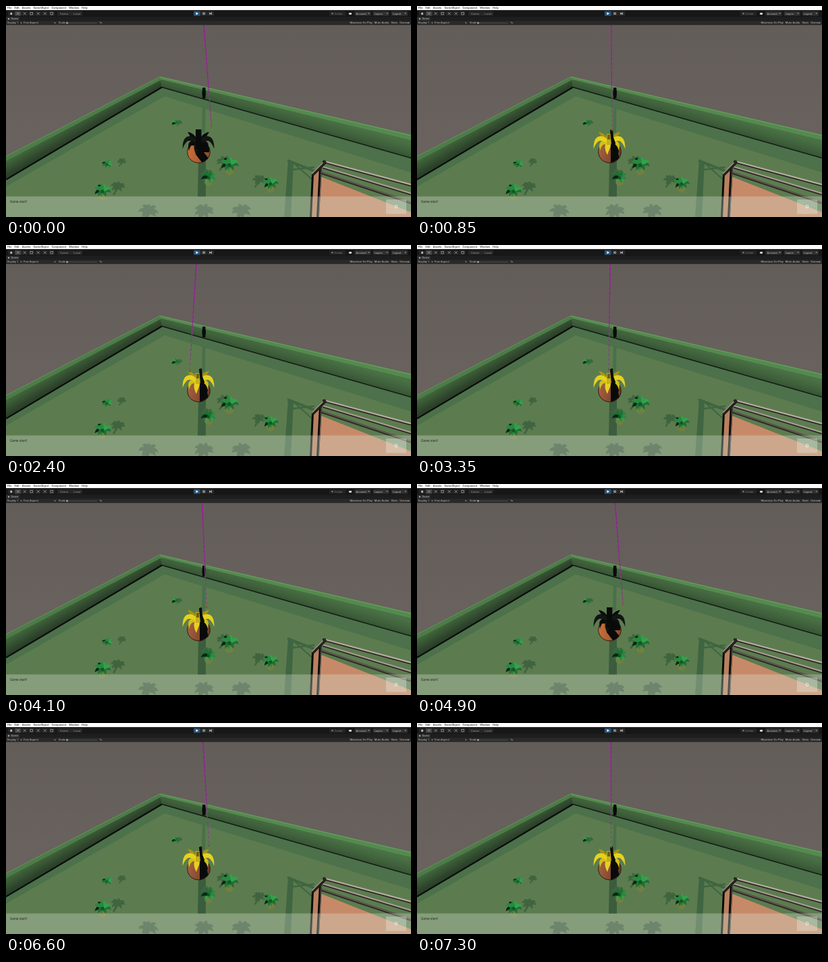
Write an HTML page with a canvas that moves like this. It is 600x313 px and loops after 7.35 s.

```html
<!DOCTYPE html>
<html lang="en">
<head>
<meta charset="utf-8">
<title>Garden game view</title>
<style>
html, body { margin: 0; width: 100%; height: 100%; overflow: hidden; background: #645e5a; }
canvas { display: block; width: 100vw; height: 100vh; }
</style>
</head>
<body>
<canvas id="stage"></canvas>
<script>
const W = 600, H = 313, LOOP = 7350, DARK = '#090b0a';
const stage = document.getElementById('stage');
const scale = window.devicePixelRatio || 1;
let c;

function prepare(canvas) {
  canvas.width = Math.round(W * scale);
  canvas.height = Math.round(H * scale);
  const ctx = canvas.getContext('2d');
  ctx.scale(canvas.width / W, canvas.height / H);
  return ctx;
}

function layer(draw) {
  const canvas = document.createElement('canvas');
  c = prepare(canvas);
  draw();
  return canvas;
}

function rect(x, y, w, h, fill) {
  c.fillStyle = fill;
  c.fillRect(x, y, w, h);
}

function poly(fill, ...p) {
  c.fillStyle = fill;
  c.beginPath();
  for (let i = 0; i < p.length; i += 2) c.lineTo(p[i], p[i + 1]);
  c.closePath();
  c.fill();
}

function line(color, width, x0, y0, x1, y1) {
  c.strokeStyle = color;
  c.lineWidth = width;
  c.beginPath();
  c.moveTo(x0, y0);
  c.lineTo(x1, y1);
  c.stroke();
}

function oval(x, y, rx, ry, fill) {
  c.fillStyle = fill;
  c.beginPath();
  c.ellipse(x, y, rx, ry, 0, 0, Math.PI * 2);
  c.fill();
}

function label(str, x, y, color = '#c0c0c0', size = 4.2) {
  c.fillStyle = color;
  c.font = size + 'px Roboto, Inter, sans-serif';
  c.textBaseline = 'middle';
  c.fillText(str, x, y);
  return c.measureText(str).width;
}

// Lays labels out from left to right
function row(words, x, y, gap, color) {
  for (const word of words) x += label(word, x, y, color) + gap;
}

function blend(x0, y0, x1, y1, ...colors) {
  const g = c.createLinearGradient(x0, y0, x1, y1);
  colors.forEach((col, i) => g.addColorStop(i / (colors.length - 1), col));
  return g;
}

// Tapered blade along a quadratic curve
function leaf(fill, x0, y0, cx, cy, x1, y1, w) {
  const left = [], right = [];
  for (let u = 0; u <= 1; u += 0.125) {
    const v = 1 - u;
    const x = v * v * x0 + 2 * u * v * cx + u * u * x1;
    const y = v * v * y0 + 2 * u * v * cy + u * u * y1;
    const dx = v * (cx - x0) + u * (x1 - cx), dy = v * (cy - y0) + u * (y1 - cy);
    const r = w / 2 * Math.sin(Math.PI * (0.2 + 0.8 * u)) / (Math.hypot(dx, dy) || 1);
    left.push(x - dy * r, y + dx * r);
    right.unshift(x + dy * r, y - dx * r);
  }
  poly(fill, ...left, ...right);
}

function rosette(x, y, r, count, tone) {
  for (let i = 0; i < count; i++) {
    const a = i * 2.4 + x * 0.1;
    const dx = Math.cos(a) * r, dy = Math.sin(a) * r * 0.7;
    leaf(tone(i, dx / r), x, y, x + dx * 0.65, y + dy * 0.7 - r * 0.45, x + dx, y + dy, r * 0.42);
  }
}

function plantShadow(x, y, r, color = '#40643f') {
  rosette(x, y, r, 8, () => color);
  line(color, r * 0.25, x, y, x - r * 0.6, y + r);
}

// Shadows lean towards the middle of the garden
function smallPlant(x, y, r) {
  plantShadow(x + (285 - x) * 0.16, y - (y - 160) * 0.05, r * 0.85);
  if (r > 10) oval(x, y + r * 0.5, r * 0.5, r * 0.55, '#717f42');
  const greens = ['#27893f', '#33a14c', '#1e6f34'];
  rosette(x, y, r, 10, (i, side) => side < -0.5 && i % 2 ? '#0d2512' : greens[i % 3]);
  oval(x, y, r * 0.2, r * 0.2, '#155528');
}

function drawGarden() {
  rect(0, 0, W, H, blend(0, 28, 0, 200, '#635d59', '#69625e'));
  poly('#4d714a', 0, 257, 231, 120, W, 225, W, H, 0, H);
  poly('#5c7c4f', 0, 268, 235, 134, W, 247, W, H, 0, H);

  poly(blend(110, 166, 128, 197, '#42683c', '#2d432b', '#202e20'),
    0, 224, 228, 105, 231, 120, 0, 257);
  poly(blend(420, 152, 412, 180, '#4a7145', '#3e5f3a', '#2d472d'),
    228, 105, W, 191, W, 225, 231, 120);
  poly('#4d7c48', 0, 223, 228, 105, 231, 109, 0, 230);
  poly('#548a4e', 228, 105, W, 191, W, 199, 230, 109);
  line('#679c60', 0.8, 0, 223, 228, 105);
  line('#6ea166', 1, 228, 105, W, 192);
  line('#090d09', 2.2, 0, 257.5, 231, 120.5);
  line('#101a13', 1.4, 231, 120.5, W, 225.5);

  poly('#49704a', 291, 150, 295.5, 150, 295, 188, 290, 188);
  poly('#3b5d3d', 285, 230, 296, 230, 296, 283, 284, 283);
  for (const x of [211, 293, 349]) plantShadow(x, 306, 15, '#385739');

  // Shadow of the bed frame
  poly('#3f6541', 418, 229, 426, 231, 422, H, 412, H);
  line('#3f6541', 3.5, 417, 229, 460, 246);
  line('#3f6541', 2.5, 423, 243, 457, 239);
  line('#3f6541', 2, 426, 233, 453, 257);

  smallPlant(251, 174, 6);
  smallPlant(150, 235, 8);
  smallPlant(143, 275, 13);
  smallPlant(331, 236, 14);
  smallPlant(300, 255, 11.5);
  smallPlant(392, 264, 12);

  rect(291, 121, 4.4, 16, DARK);
  oval(293.2, 129, 2.8, 7, DARK);
}

function drawBed() {
  poly('#b9805f', 454, 251, 467, 241, 463, H, 451, H);
  poly('#c78a69', 466, 253, W, 306, W, H, 463, H);
  for (let i = 0; i < 3; i++) {
    const x = 472 - i * 2.5, y = 230.5 + i * 8, end = 265 + i * 13;
    line('#2b2622', 3.6, x, y + 1, W, end + 1);
    line(['#b9aea3', '#a89e94', '#5d564e'][i], 2.3, x, y, W, end);
  }
  line(DARK, 3, 454.5, 249, 451.5, H);
  line(DARK, 4, 466, 239, 462, H);
  line('#84776b', 0.8, 467, 241, 463.5, H);
  line('#24201d', 4, 454, 251, 474, 231);
  line('#a0958a', 1.4, 453, 249, 471, 231);
  oval(471.5, 231, 2.6, 2.3, '#2a2521');
}

function drawOverlay() {
  rect(0, 282.5, W, 30.5, 'rgba(215,222,208,0.34)');
  rect(563, 287, 30, 21.5, 'rgba(235,238,228,0.33)');
  label('Game start!', 6, 291, '#253022', 4.8);
  label('0', 575.7, 298, '#fff', 8);
}

function drawIcons() {
  for (let i = 0; i < 7; i++) {
    const x = 7.7 + i * 10;
    rect(x - 4.7, 8, 9.4, 6.5, i === 1 ? '#444' : '#242424');
    if (i === 0) oval(x, 11.3, 1.5, 1.9, '#bbb');
    else if (i % 3) {
      line('#aaa', 0.7, x - 2, 13, x + 2, 9.4);
      line('#aaa', 0.7, x - 2, 9.4, x + 2, 13);
    } else {
      c.strokeStyle = '#aaa';
      c.strokeRect(x - 1.7, 9.5, 3.4, 3.4);
    }
  }
  for (let i = 0; i < 3; i++) rect(278 + i * 10.2, 7.8, 9.6, 6.8, i ? '#282828' : '#28557c');
  poly('#fff', 281.5, 9.2, 285, 11.2, 281.5, 13.2);
  rect(291.6, 9.4, 1, 3.6, '#ddd');
  rect(293.6, 9.4, 1, 3.6, '#ddd');
  poly('#ddd', 301.5, 9.4, 304, 11.2, 301.5, 13);
  rect(304.2, 9.4, 0.8, 3.6, '#ddd');
}

function drawEditor() {
  rect(0, 0, W, 6.2, '#fbfbfb');
  rect(0, 6.2, W, 9.8, '#171717');
  rect(0, 16, W, 6, '#1e1e1e');
  rect(0, 16, 20, 6, '#2d2d2d');
  rect(0, 22, W, 6.2, '#292929');
  row(['File', 'Edit', 'Assets', 'GameObject', 'Component', 'Window', 'Help'], 2, 3.2, 4, '#111');

  drawIcons();
  rect(76, 8, 37, 6.5, '#262626');
  row(['Center', 'Local'], 80, 11.3, 8, '#999');

  rect(479, 8, 24, 6.5, '#232323');
  oval(483.5, 11.2, 1.3, 1.3, '#777');
  label('Collab', 486.5, 11.3, '#777');
  oval(510, 11.5, 2.3, 1.4, '#ddd');
  ['Account', 'Layers', 'Layout'].forEach((word, i) => {
    const x = 518.5 + i * 27.2;
    rect(x - 2, 8, 24, 6.5, '#303030');
    label(word, x, 11.3);
    poly('#aaa', x + 17.5, 10.5, x + 20.5, 10.5, x + 19, 12);
  });

  oval(4, 19, 1.2, 1.2, '#aaa');
  label('Game', 7.5, 19.1);
  label('Display 1', 1.5, 25.2);
  label('Free Aspect', 26, 25.2);
  label('Scale', 78, 25.2);
  label('1x', 138, 25.2);
  row(['Maximize On Play', 'Mute Audio', 'Stats', 'Gizmos'], 509.5, 25.2, 3.2);
  for (const x of [21, 71, 595]) poly('#aaa', x, 24.5, x + 3, 24.5, x + 1.5, 26);
  line('#606060', 0.7, 89, 25.2, 135, 25.2);
  oval(90.5, 25.2, 1.4, 1.4, '#aaa');
}

function drawPlant(lit) {
  const tone = n => lit ? ['#d3bf18', '#e5d120', '#a7950f'][n] : ['#0b0d0c', '#121513', DARK][n];
  const x = 285;
  c.save();
  c.beginPath();
  c.ellipse(x + 0.5, 216.5, 17, 16.5, 0, 0, Math.PI * 2);
  c.clip();
  rect(268, 199, 36, 35, lit
    ? blend(270, 212, 302, 222, '#a2603f', '#8b4d33', '#693825')
    : blend(270, 212, 302, 222, '#c66e39', '#b26034', '#8b4824'));
  rect(268, 199, 36, lit ? 6 : 8, DARK);
  if (lit) poly(DARK, 287, 200, 302, 203, 298, 219, 300, 226, 287, 234);
  else poly(DARK, 279, 204, 303, 204, 301, 217, 293, 217, 300, 226, 291, 233, 281, 220);
  c.restore();
  c.strokeStyle = '#2b1b14';
  c.lineWidth = 1;
  c.beginPath();
  c.ellipse(x + 0.5, 216.5, 16.8, 16.2, 0, 0, Math.PI * 2);
  c.stroke();

  for (const s of [-1, 1]) {
    leaf(tone(2), x + 2 * s, 203, x + 9 * s, 191, x + 16 * s, 187, 6);
    leaf(tone(0), x + 2 * s, 204, x + 14 * s, 198, x + 14 * s, 215, 6);
    leaf(tone(1), x + 2 * s, 202, x + 19 * s, 187, x + 23.5 * s, 212, 7);
  }
  leaf(tone(1), x, 202, x - 4, 208, x - 3, 221, 8);
  if (lit) {
    rect(x - 4, 190, 6, 16, '#c5b018');
    rect(x - 3, 191, 4, 7, '#725d18');
    poly(DARK, 286, 184, 290, 183, 291, 195, 294, 203, 292, 222, 287, 226, 288, 207);
  } else rect(x - 4, 183, 8.5, 30, DARK);
}

// Pointer sway: time and horizontal position of the ray's end
const sway = [[0, 304.5], [850, 289], [2400, 272], [3350, 284], [4100, 297], [5800, 310], [LOOP, 287]];

function pace(i) {
  const a = sway[i - 1], b = sway[i], d = sway[i + 1];
  if (!a) return (d[1] - b[1]) / (d[0] - b[0]);
  if (!d) return (b[1] - a[1]) / (b[0] - a[0]);
  const p = (b[1] - a[1]) / (b[0] - a[0]), q = (d[1] - b[1]) / (d[0] - b[0]);
  return p * q <= 0 ? 0 : 2 * p * q / (p + q);
}

function swayAt(t) {
  const i = sway.findIndex(k => k[0] > t) - 1;
  const [t0, x0] = sway[i], [t1, x1] = sway[i + 1];
  const h = t1 - t0, u = (t - t0) / h, v = 1 - u;
  return v * v * (1 + 2 * u) * x0 + u * u * (1 + 2 * v) * x1
    + h * u * v * (v * pace(i) - u * pace(i + 1));
}

function drawRay(x, lit) {
  const top = 282 + (x - 272) * 0.342;
  const y = lit ? 184 + (289 - x) * 0.2 : 180 - (x - 304.5) * 0.55;
  const tone = blend(top, 28, x, y, '#9c229d', '#97289a', lit ? '#80607f' : '#91407f');
  poly(tone, top - 0.9, 28.2, top + 0.9, 28.2, x + 0.45, y, x - 0.45, y);
  c.setLineDash([3, 4]);
  line('rgba(75,50,75,0.5)', 0.8, top, 28.2, x, y);
  c.setLineDash([]);
  oval(x, y, 1.1, 1.6, lit ? '#76551e' : '#a44f38');
}

const scene = layer(() => { drawGarden(); drawBed(); });
const chrome = layer(() => { drawOverlay(); drawEditor(); });
const plants = [false, true].map(lit => layer(() => drawPlant(lit)));
c = prepare(stage);

const begin = performance.now();
function frame(now) {
  const t = Math.floor(Math.max(0, now - begin) % LOOP / 50) * 50;
  const x = swayAt(t), lit = x < 301;
  for (const image of [scene, plants[+lit]]) c.drawImage(image, 0, 0, W, H);
  drawRay(x, lit);
  c.drawImage(chrome, 0, 0, W, H);
  requestAnimationFrame(frame);
}
frame(begin);
</script>
</body>
</html>
```
